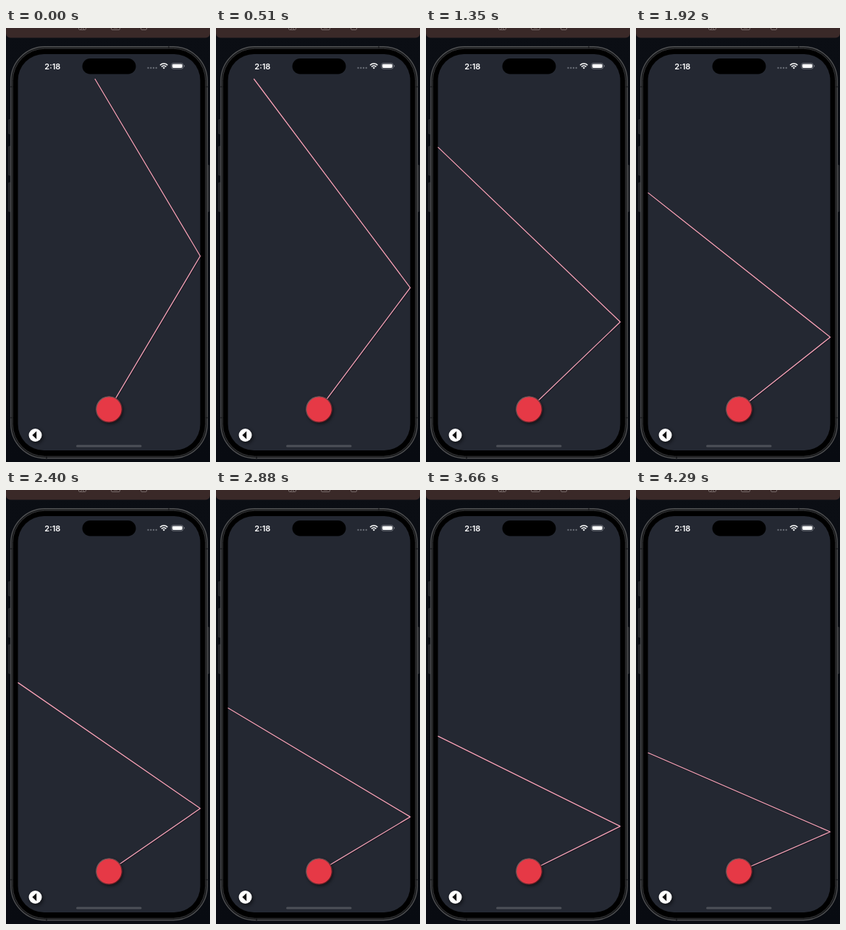
Animation, 282 px wide and 598 px high, one loop 4.32 s. Source, as an HTML page:

```html
<!DOCTYPE html>
<html lang="en">
<head>
<meta charset="utf-8">
<title>Aim line</title>
<style>
  html, body { margin: 0; width: 100%; height: 100%; overflow: hidden; background: #090c12; }
  svg { display: block; width: 282px; height: 598px; }
  .time { font: 600 11px Inter, "Liberation Sans", sans-serif; fill: #fff; }
</style>
</head>
<body>
<svg viewBox="0 0 282 598">
  <defs>
    <linearGradient id="desk" x2="0" y2="1">
      <stop offset="0" stop-color="#0b0e14"/>
      <stop offset="1" stop-color="#080b11"/>
    </linearGradient>
    <linearGradient id="rim" x2="1" y2="1">
      <stop offset=".1" stop-color="#6f6262"/>
      <stop offset=".5" stop-color="#7b3b42"/>
      <stop offset=".9" stop-color="#5a141b"/>
    </linearGradient>
    <filter id="soft" x="-50%" y="-50%" width="200%" height="200%">
      <feGaussianBlur stdDeviation="2"/>
    </filter>
    <clipPath id="top"><rect width="282" height="13"/></clipPath>
  </defs>

  <rect width="282" height="598" fill="url(#desk)"/>
  <rect x="0" y="-12" width="282" height="25.5" rx="6" fill="#3a2928"/>
  <g clip-path="url(#top)" fill="none" stroke="#776a69" stroke-width="1">
    <rect x="100.5" y="-6" width="10" height="8.500" rx="1.500"/>
    <path d="M103 2l2.500-2.500 2.500 2.500"/>
    <rect x="145.500" y="-6" width="12" height="8.500" rx="1.500"/>
    <path d="M149 0h5"/>
    <rect x="186.500" y="-6" width="8" height="8.500" rx="1.500"/>
  </g>

  <g fill="#24262a" stroke="#393b3e" stroke-width=".5">
    <rect x="3.500" y="126" width="4" height="20" rx="1"/>
    <rect x="3.500" y="163" width="4" height="40" rx="1"/>
    <rect x="3.500" y="213" width="4" height="40" rx="1"/>
    <rect x="277" y="189" width="4" height="64" rx="1"/>
  </g>
  <rect x="6.750" y="25.750" width="271.500" height="567" rx="47" fill="#17181a" stroke="#505153" stroke-width="1.300"/>
  <rect x="9.250" y="28.250" width="266.500" height="562" rx="44.500" fill="#000" stroke="#343537" stroke-width="1"/>
  <path d="M6.500 81h3M275.500 81h3M6.500 537h3M275.500 537h3M225 25.500v3M56 590v3" stroke="#1c1d1f" stroke-width="2"/>
  <rect x="16.500" y="36" width="252" height="546" rx="36" fill="#242832"/>
  <rect x="105.500" y="42" width="74" height="21.500" rx="10.750" fill="#000"/>

  <text class="time" x="53.300" y="56.500">2:18</text>
  <g fill="#666a72">
    <circle cx="196.500" cy="55" r="1.200"/><circle cx="200.300" cy="55" r="1.200"/>
    <circle cx="204" cy="55" r="1.200"/><circle cx="207.700" cy="55" r="1.200"/>
  </g>
  <g fill="none" stroke="#fff" stroke-width="1.600">
    <path d="M213 51.200a7.300 7.300 0 0 1 10.400 0"/>
    <path d="M215 53.400a4.500 4.500 0 0 1 6.400 0"/>
  </g>
  <path d="M216.500 54.800a2.500 2.500 0 0 1 3.400 0l-1.700 1.800z" fill="#fff"/>
  <rect x="228.700" y="48.600" width="16.200" height="7.600" rx="2.400" fill="none" stroke="#858890" stroke-width=".8"/>
  <rect x="229.900" y="49.800" width="13.800" height="5.200" rx="1.400" fill="#fff"/>
  <path d="M246 51a1.500 1.500 0 0 1 0 2.800z" fill="#858890"/>

  <g fill="none" stroke-linejoin="bevel">
    <path class="aim" transform="translate(.8 1)" stroke="#190f19" stroke-opacity=".45" stroke-width="1.800"/>
    <path class="aim" stroke="#f9a5b9" stroke-width="1.250"/>
  </g>

  <circle cx="144" cy="527.500" r="18" fill="#000" opacity=".55" filter="url(#soft)"/>
  <circle cx="142.500" cy="525.500" r="17.700" fill="#e63946" stroke="url(#rim)" stroke-width="1.300"/>

  <circle cx="42" cy="563" r="10" fill="#000" opacity=".45" filter="url(#soft)"/>
  <circle cx="40.500" cy="561" r="9" fill="#fff"/>
  <path d="M36.300 561l5.900-5.500v11z" fill="#111"/>
  <rect x="97" y="574.500" width="90.500" height="3" rx="1.500" fill="#4d5058"/>
</svg>
<script>
  const LOOP = 4320, STEP = 30;
  const ball = { x: 142.5, y: 525.5 };
  const wall = { left: 16.5, right: 268.5, top: 70 };

  // time in ms, steepness of the aim line
  const keys = [
    [0, 1.677], [510, 1.331], [1080, 1.057], [1350, .956], [1620, .877], [1920, .79],
    [2160, .737], [2880, .596], [3240, .549], [3660, .493], [4290, .4325]
  ];

  const slope = (a, b) => (b[1] - a[1]) / (b[0] - a[0]);
  const tangents = keys.map((k, i) =>
    slope(keys[Math.max(i - 1, 0)], keys[Math.min(i + 1, keys.length - 1)]));

  function steepness(t) {
    let i = 0;
    while (i < keys.length - 2 && t > keys[i + 1][0]) i++;
    const [t0, a] = keys[i], [t1, b] = keys[i + 1];
    const d = t1 - t0, u = (t - t0) / d, v = 1 - u;
    return a * (1 + 2 * u) * v * v + b * u * u * (3 - 2 * u)
      + d * u * v * (tangents[i] * v - tangents[i + 1] * u);
  }

  function aimPath(m) {
    const bounceY = ball.y - m * (wall.right - ball.x);
    const endX = Math.max(wall.left, wall.right - (bounceY - wall.top) / m);
    const endY = bounceY - m * (wall.right - endX);
    return `M${ball.x} ${ball.y}L${wall.right} ${bounceY}L${endX} ${endY}`;
  }

  const lines = document.querySelectorAll('.aim');
  const start = performance.now();

  function draw(now) {
    const t = Math.max(0, now - start) % LOOP;
    const d = aimPath(steepness(Math.floor(t / STEP) * STEP));
    lines.forEach(line => line.setAttribute('d', d));
    requestAnimationFrame(draw);
  }
  draw(start);
</script>
</body>
</html>
```
